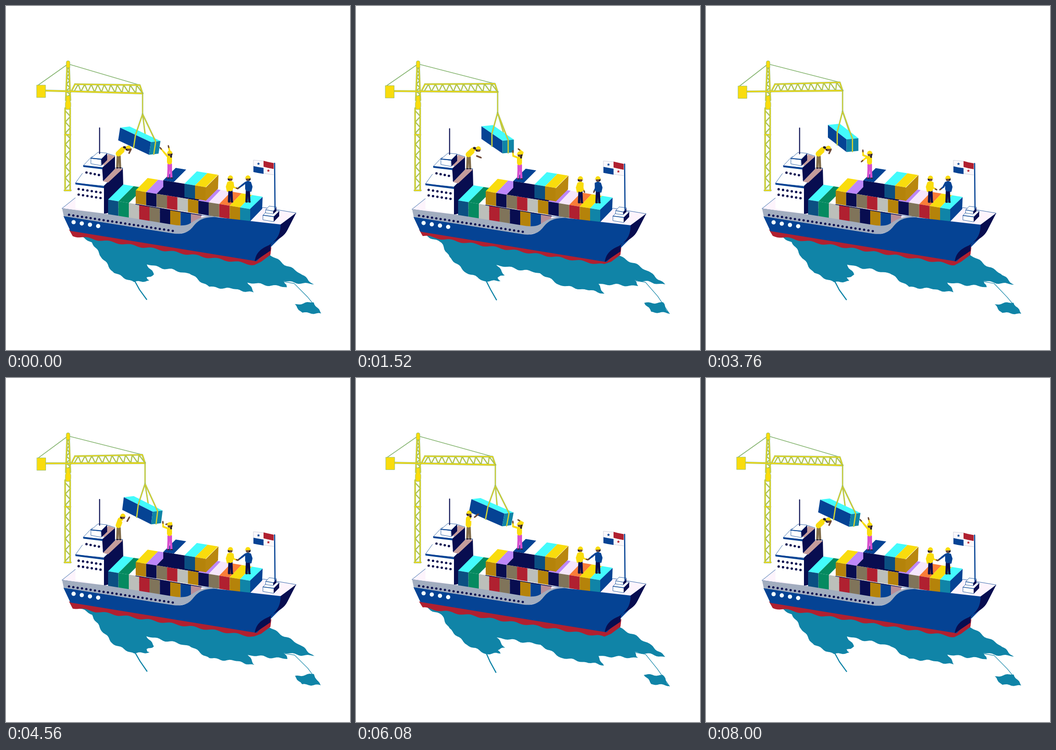
Recreate the animation shown at these times as an HTML page with a canvas. Size 748 px wide and 748 px high, loop 8.08 s.

```html
<!DOCTYPE html>
<html lang="en">
<head>
<meta charset="utf-8">
<title>Loading a cargo ship</title>
<style>
html, body { margin: 0; width: 100%; height: 100%; overflow: hidden; background: #fff; }
canvas { display: block; width: 100vw; height: 100vh; }
</style>
</head>
<body>
<canvas id="stage" width="748" height="748"></canvas>
<script>
const ctx = document.getElementById('stage').getContext('2d');
const LOOP = 8080, STEP = 80, TAU = Math.PI * 2;
const BLUE = '#054394', NAVY = '#080d50', TEAL = '#1084a7', CYAN = '#43fbfc', YELLOW = '#f9dc0d',
  GOLD = '#b5830a', RED = '#b02030', GREEN = '#058a60', OLIVE = '#80745a', GRAY = '#bcbfba',
  LILAC = '#bd87fa', ORANGE = '#fa7c38', PALE = '#fdf4fc', MIX = '#0b4f82', SKIN = '#6d4938',
  HAIR = '#251c30', LEAF = '#86b570', BAND = '#a2adbf', TAN = '#c49c9b', PINK = '#d750cf';

// ---- drawing helpers ----
function shape(color, d, outline) {
  const path = new Path2D(d);
  ctx.fillStyle = color;
  ctx.fill(path);
  if (outline) { ctx.strokeStyle = outline; ctx.lineWidth = 0.8; ctx.stroke(path); }
}
const poly = (color, points) => shape(color, 'M' + points.map(p => p.join()).join('L') + 'Z');
function line(color, width, ...points) {
  ctx.strokeStyle = color;
  ctx.lineWidth = width;
  ctx.beginPath();
  points.forEach(p => ctx.lineTo(...p));
  ctx.stroke();
}
function dots(count, color, r, x, y, dx = 0, dy = 0) {
  ctx.fillStyle = color;
  for (let i = 0; i < count; i++) {
    ctx.beginPath();
    ctx.arc(x + i * dx, y + i * dy, r, 0, TAU);
    ctx.fill();
  }
}
function star(color, x, y, r) {
  poly(color, Array.from({ length: 10 }, (_, i) => {
    const a = i * TAU / 10 - TAU / 4, k = i % 2 ? r * 0.4 : r;
    return [x + k * Math.cos(a), y + k * Math.sin(a)];
  }));
}
const mix = (a, b, k) => a + (b - a) * k;
const mixPoint = (p, q, k) => [mix(p[0], q[0], k), mix(p[1], q[1], k)];
const add = (...ps) => ps.reduce((p, q) => [p[0] + q[0], p[1] + q[1]]);
const scale = (p, k) => [p[0] * k, p[1] * k];

// ---- timing ----
function ease(t, from, to) {
  const u = Math.min(1, Math.max(0, (t - from) / (to - from)));
  return (1 - Math.cos(Math.PI * u)) / 2;
}
// A smooth bump around a moment, wrapping over the end of the loop.
function pulse(t, center, width) {
  const gap = Math.abs(t - center), d = Math.min(gap, LOOP - gap);
  return d < width ? (1 + Math.cos(Math.PI * d / width)) / 2 : 0;
}

// ---- water ----
function rippled(corners, phase) {
  return corners.flatMap((p, i) => {
    const q = corners[(i + 1) % corners.length];
    const dx = q[0] - p[0], dy = q[1] - p[1], length = Math.hypot(dx, dy), steps = Math.ceil(length / 5);
    return Array.from({ length: steps }, (_, k) => {
      const u = k / steps;
      const h = 2.4 * Math.sin(Math.PI * u) * Math.sin(u * length / 6 + i - phase) / length;
      return [p[0] + dx * u - dy * h, p[1] + dy * u + dx * h];
    });
  });
}

function drawWater(t) {
  const phase = 2 * TAU * t / LOOP;
  const drift = p => add(p, [1.5 * Math.sin(phase + p[1] / 20), 1.5 * Math.sin(phase + p[0] / 30)]);
  const patch = corners => poly(TEAL, rippled(corners.map(drift), phase));
  patch([[140, 492], [186, 514], [205, 545], [236, 579], [280, 600], [313, 598], [307, 591], [323, 585], [306, 563],
    [400, 581], [443, 609], [500, 617], [539, 624], [526, 603], [612, 610], [605, 597], [671, 606], [641, 581], [572, 541]]);
  patch([[627, 647], [668, 645], [683, 669], [643, 666]]);
  line(TEAL, 2.4, ...[[282, 599], [291, 617], [305, 639]].map(drift));
  line(TEAL, 1.2, ...[[605, 598], [628, 602], [655, 632], [683, 669]].map(drift));

  const keel = [[137, 486], [541, 548], [577, 524], [575, 541], [555, 556]];
  for (let x = 540; x >= 141; x -= 5) {
    keel.push([x, 499 + 0.16 * (x - 141) + 2 * Math.sin(x / 7.5 + phase)]);
  }
  poly(RED, keel);
}

// ---- ship ----
function drawDeck() {
  shape(PALE, 'M122 440L152 416L225 440L460 458L560 438L631 450L597 476L400 480Z', BLUE);
}

function drawSide() {
  shape(BAND, 'M122 440L212 451L360 475Q385 480 398 474C410 468 420 457 447 457L460 459L400 490L370 497L126 459Z');
  shape(BLUE, 'M125 457L366 495C392 497 400 488 409 477C420 464 432 459 455 459L597 475L600 500L545 555L140 489Z');
  shape(NAVY, 'M631 450L597 475C597 493 592 507 572 520C550 529 543 540 541 555L575 532L576 516C593 507 606 500 612 487Z');
  dots(25, NAVY, 2.5, 137, 454, 9.4, 1.46);
  dots(4, '#f4ffff', 4.6, 147, 470, 17.8, 2.8);
}

function drawBridge() {
  shape('#fff', 'M151 385L214 394V452L151 440Z');
  shape(NAVY, 'M213 390L254 352L255 391L222 422V450L213 452Z');
  shape('#fff', 'M151 385L166 364L213 378L236 352H254L213 391Z', BLUE);
  shape(TAN, 'M211 381L238 353L254 354L222 384Z');
  shape(BLUE, 'M151 384L213 392V396L151 388Z');
  dots(6, NAVY, 2.6, 158, 398, 9.5, 1.5);
  dots(6, NAVY, 2.6, 158, 410, 9.5, 1.5);

  shape('#fff', 'M168 347L210 352V381L166 371Z');
  shape(NAVY, 'M209 350L237 326V354L211 381Z');
  shape('#fff', 'M168 347L186 328L222 321L237 326L210 351Z', BLUE);
  shape(TAN, 'M211 346L222 322L237 327L214 347Z');
  shape(BLUE, 'M168 346L210 351V355L168 350Z');
  dots(4, NAVY, 2.6, 175, 362, 9, 1.8);

  shape('#fff', 'M185 331L207 334V347L185 343Z', BLUE);
  shape(NAVY, 'M207 333L220 320V335L208 347Z');
  shape('#fff', 'M185 331L200 318L220 320L207 333Z', BLUE);
  line(BLUE, 2, [185, 331], [207, 333]);
  line(NAVY, 2.2, [203.5, 265], [203.5, 321]);
}

// A row of boxes: front faces and lids share a sloping top edge.
function boxRow(x, y, width, height, depth, fronts, lids) {
  const side = [width, 0.163 * width];
  fronts.forEach((color, i) => {
    const a = add([x, y], scale(side, i)), b = add(a, side);
    if (lids[i]) poly(lids[i], [a, add(a, depth), add(b, depth), b]);
    poly(color, [a, b, add(b, [0, height]), add(a, [0, height])]);
  });
}

function drawCargo() {
  boxRow(222, 421, 22.5, 37, [33, -33],
    [MIX, GREEN, GRAY, RED, OLIVE, NAVY, GOLD, BLUE, '#b78d98'], [CYAN, GREEN]);
  boxRow(282, 401, 22.7, 28.5, [26, -27],
    [GOLD, NAVY, OLIVE, RED, GRAY, GOLD, NAVY, OLIVE, RED, GOLD, TEAL],
    [YELLOW, LILAC, NAVY, NAVY, NAVY, NAVY, LILAC, '#f6e6fb', ORANGE, YELLOW, CYAN]);
  line(NAVY, 1.5, [282, 431], [425, 455]);
  shape(BLUE, 'M531 441L558 415L557 441L531 468Z');
  boxRow(342, 379, 23, 29, [27, -27], [NAVY, NAVY, MIX, GOLD], [BLUE, '#fff', CYAN, YELLOW]);
  shape('#b9870f', 'M434 395L462 367L461 397L434 424Z');
}

function drawBow(t) {
  shape('#fff', 'M559 455L570 442L594 446L593 457L582 469L559 465Z', BLUE);
  shape(NAVY, 'M582 458L594 446V457L582 469Z');
  line(BLUE, 1.5, [559, 455], [582, 458]);
  shape('#fff', 'M565 443L572 435L588 437L587 445L581 452L565 450Z', BLUE);
  shape(NAVY, 'M581 446L588 438V446L581 452Z');
  line(BLUE, 1.2, [565, 443], [581, 446]);
  line(BLUE, 2.6, [584, 342], [585, 442]);

  const flap = 0.8 * Math.sin(2 * TAU * t / LOOP);
  const cloth = (color, x, y, slope) =>
    shape(color, `M${x} ${y}q10 ${slope * 0.6 - flap} 22 ${slope}v13q-12 ${-slope * 0.4 - flap} -22 ${-slope}Z`);
  cloth('#fbf8fb', 538, 335, 2);
  cloth(RED, 560, 336.5, 5);
  cloth(BLUE, 538, 348, 4);
  cloth('#fbf8fb', 560, 350.5, 4);
  line('#b9bfd0', 0.7, [538, 348], [538, 335], [560, 337]);
  line('#b9bfd0', 0.7, [560, 364], [582, 367]);
  star(BLUE, 549, 343, 3.6);
  star(RED, 570.5, 358, 3.6);
}

// ---- people ----
function arm(shoulder, hand, length, bend, sleeve, forearm) {
  const dx = hand[0] - shoulder[0], dy = hand[1] - shoulder[1], d = Math.hypot(dx, dy) || 1;
  const out = bend * Math.sqrt(Math.max(0, length * length - d * d / 4)) / d;
  const elbow = [shoulder[0] + dx / 2 - dy * out, shoulder[1] + dy / 2 + dx * out];
  line(sleeve, 4, shoulder, elbow);
  line(forearm, 3.4, elbow, mixPoint(elbow, hand, 0.8));
  line(SKIN, 3, mixPoint(elbow, hand, 0.7), hand);
}
function head(x, y, side) {
  dots(1, HAIR, 4, x - side * 2, y + 4);
  dots(1, SKIN, 3.6, x + side, y + 4.5);
  shape(YELLOW, `M${x - 5.5} ${y + 2}a5.5 5.8 0 0 1 11 0l${side} 1.2h-12Z`);
}
function legs(color, x, top, foot, spread) {
  for (const side of [-1, 1]) {
    const heel = x + side * spread;
    line(color, 5, [x + side * 2, top], [heel, foot]);
    line(HAIR, 2.4, [heel - 1, foot + 1], [heel + 2, foot + 1]);
  }
}

function drawRoofWorker(t) {
  const bend = 1 - ease(t, 4000, 5000) + ease(t, 7000, 7900);
  const shoulder = mixPoint([245, 308], [254, 312], bend);
  const hand = add(mixPoint([266, 298], [272, 311], bend), [0, 17 * pulse(t, 1520, 700)]);
  const hat = mixPoint([246, 294], [266, 307], bend);
  legs('#806c4a', 245, 327, 351, 3);
  line(YELLOW, 12, [244.5, 321], shoulder);
  line(HAIR, 5, add(hat, [2, 4]), mixPoint([249, 303], [257, 307], bend));
  head(...hat, 1);
  arm(add(shoulder, [5, 3]), hand, 10, 1, PALE, SKIN);
}

function drawSignaller(t) {
  const cheer = pulse(t, 0, 1000), hold = pulse(t, 6880, 1000);
  const lowered = ease(t, 1600, 2300) - ease(t, 3900, 5000);
  const left = [341 - 6 * cheer, 313 - 5 * cheer + 8 * hold];
  const right = add(mixPoint([353, 309], [338, 338], lowered), [-6 * hold, 16 * hold - 5 * cheer]);
  arm([359, 328], right, 12, 1, YELLOW, YELLOW);
  legs(PINK, 356, 347, 373, 3.5);
  line(PINK, 10, [356, 345], [356, 351]);
  line(YELLOW, 11, [355.5, 331], [355.5, 339]);
  line(HAIR, 4, [358, 321], [359, 328]);
  head(356, 318, -1);
  arm([352, 328], left, 11, -1, YELLOW, YELLOW);
}

function drawPartners(t) {
  const grip = 1 - pulse(t, 1520, 700) - 0.35 * pulse(t, 3760, 700) - pulse(t, 6880, 900);
  for (const [x, side, coat, rest] of [[488, 1, YELLOW, 497], [526, -1, BLUE, 517]]) {
    legs(NAVY, x, 400, 425, 3);
    line(coat, 12, [x, 386], [x, 397]);
    line(coat, 4, [x - side * 5, 384], [x - side * 8, 393], [x - side * 6, 402]);
    head(x, 372, side);
    arm([x + side * 5, 384], mixPoint([rest, 403], [504, 397], grip), 10, side, coat, coat);
  }
}

// ---- crane and load ----
function bars(width, ...paths) {
  paths.forEach(p => line(LEAF, width + 1.6, ...p));
  paths.forEach(p => line(YELLOW, width, ...p));
}
const zigzag = (count, a, b, c, d) => Array.from({ length: count + 1 },
  (_, i) => i % 2 ? mixPoint(c, d, i / count) : mixPoint(a, b, i / count));

function drawCrane(t) {
  const swing = -1 + 2 * ease(t, 0, 3000) - 2 * ease(t, 3800, 6900);
  const tip = [308 - 11 * swing * swing, 187 - 3 * swing];
  const weight = [64 + 4.5 * swing * swing + 1.5 * swing, 173 + swing];
  const jibTop = add(tip, [-6, -18]);

  line(LEAF, 1.6, add(weight, [3, 0]), [135, 126], jibTop);
  bars(0.9, zigzag(14, [129, 228], [129, 398], [140, 228], [140, 398]));
  bars(1.8, [[128.5, 222], [128.5, 401]], [[139.5, 222], [139.5, 401]], [[128, 280], [140, 280]], [[127, 401], [141, 401]]);
  bars(0.9, zigzag(9, [130, 200], [133, 132], [140, 200], [137, 132]));
  bars(1.8, [[130, 205], [133, 126]], [[140, 205], [137, 126]]);
  shape(YELLOW, 'M131 195H139V205L141 211V219L138 225H131L129 219V211L131 205Z', LEAF);
  shape(YELLOW, 'M131 134V123A4 4 0 0 1 139 123V134Z', LEAF);

  const root = [148, 186], rootTop = [150, 170];
  bars(0.9, zigzag(20, root, tip, rootTop, jibTop));
  bars(1.8, [rootTop, jibTop, tip], [[142, 186], rootTop]);
  bars(2.6, [add(weight, [18, 12]), [142, 185.5], tip]);
  const [x, y] = weight;
  shape(YELLOW, `M${x} ${y}h19v27h-19Z`, LEAF);
  drawLoad(t, tip);
}

function drawLoad(t, tip) {
  // The box turns: as its long side narrows, its short side widens.
  const span = -67 + 44 * ease(t, 300, 2800) - 49 * ease(t, 2700, 5300) + 5 * ease(t, 6880, LOOP);
  const long = [span, -31.5], wide = [33.5 + 0.19 * span, -2.5];
  const down = [Math.min(0, (span + 46) / 5), 27.5];
  const corner = add(tip, [-6 - 0.36 * span, 106]);
  const apex = add(tip, [0, 45]);
  const back = add(corner, wide);

  bars(1.2, [tip, apex], [apex, add(back, scale(long, 0.5))]);
  poly(CYAN, [corner, back, add(back, long), add(corner, long)]);
  poly(BLUE, [corner, add(corner, long), add(corner, long, down), add(corner, down)]);
  poly(TEAL, [corner, back, add(back, down), add(corner, down)]);
  for (const edge of [long, wide]) {
    const top = add(corner, scale(edge, 0.5));
    bars(1.4, [apex, top, add(top, down)]);
  }
}

function afloat(t, ...parts) {
  ctx.save();
  ctx.translate(0, 2 * Math.sin(TAU * t / LOOP));
  parts.forEach(part => part(t));
  ctx.restore();
}

function draw(t) {
  ctx.clearRect(0, 0, 748, 748);
  ctx.lineJoin = ctx.lineCap = 'round';
  drawWater(t);
  afloat(t, drawDeck, drawBridge, drawCargo, drawSide, drawBow);
  drawCrane(t);
  afloat(t, drawRoofWorker, drawSignaller, drawPartners);
}

function tick() {
  const t = performance.now() % LOOP;
  draw(Math.floor(t / STEP) * STEP);
  requestAnimationFrame(tick);
}
tick();
</script>
</body>
</html>
```
